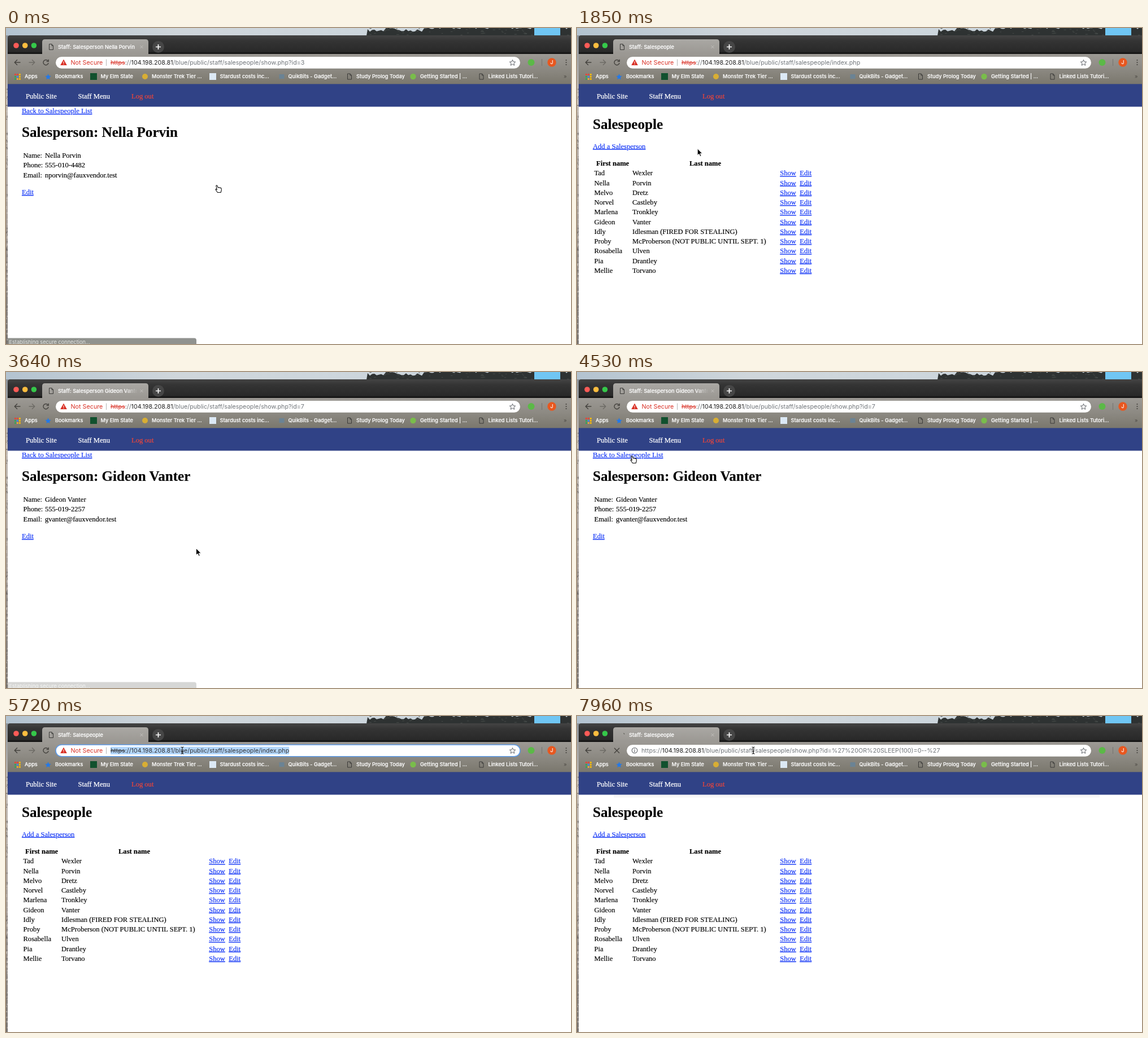
Animation of 1000x560 px, one loop 8 s. Source, as an HTML page:

```html
<!DOCTYPE html>
<html lang="en">
<head>
<meta charset="utf-8">
<title>Salespeople admin</title>
<style>
  html, body { margin: 0; width: 100%; height: 100%; overflow: hidden; background: #fff; }
  svg { display: block; width: 100vw; height: 100vh; }
  text { white-space: pre; }
  .ui { font: 500 9.2px Inter, Roboto, sans-serif; }
  .label { stroke: #fff; stroke-width: .2; }
  .url { font: 400 10.76px Inter, Roboto, sans-serif; }
  .page { font: 12.55px "Liberation Serif", "Times New Roman", serif; stroke: #000; stroke-width: .15; }
  .bold { font-weight: 700; }
  .h1 { font-size: 25.1px; font-weight: 700; }
  .link { fill: #0b2ff5; stroke: #0b2ff5; text-decoration: underline; }
  .nav { stroke: #fff; stroke-width: .25; }
  .logout { stroke: #fa4635; }
  .popup { filter: drop-shadow(0 3px 4px #0005); }
</style>
</head>
<body>
<svg viewBox="0 0 1000 560" preserveAspectRatio="none">
  <defs>
    <linearGradient id="sky"><stop stop-color="#b3c3d0"/><stop offset=".3" stop-color="#cfd6db"/><stop offset="1" stop-color="#c9d5de"/></linearGradient>
    <linearGradient id="shore" x2="0" y2="1"><stop stop-color="#8d949b"/><stop offset=".2" stop-color="#c3bcb5"/><stop offset=".6" stop-color="#a69d97"/><stop offset="1" stop-color="#77726e"/></linearGradient>
    <linearGradient id="strip" x2="0" y2="1"><stop stop-color="#444"/><stop offset=".3" stop-color="#343434"/><stop offset=".88" stop-color="#292929"/><stop offset=".95" stop-color="#151515"/></linearGradient>
    <linearGradient id="tab" x2="0" y2="1"><stop stop-color="#aaa8a4"/><stop offset="1" stop-color="#9a9792"/></linearGradient>
    <linearGradient id="bar" x2="0" y2="1"><stop stop-color="#9c9994"/><stop offset=".5" stop-color="#8c8982"/><stop offset="1" stop-color="#7a776d"/></linearGradient>
    <linearGradient id="fade" gradientUnits="userSpaceOnUse" x1="210" x2="233"><stop stop-color="#fff"/><stop offset="1" stop-color="#000"/></linearGradient>
    <mask id="titleFade" maskUnits="userSpaceOnUse" x="80" y="20" width="160" height="26"><rect x="80" y="20" width="160" height="26" fill="url(#fade)"/></mask>
  </defs>
  <g id="backdrop"></g>
  <g id="scene"></g>
</svg>
<script>
const LOOP = 8000;
const HOST = '104.198.208.81';
const DIR = '/blue/public/staff/salespeople/';
const LIST = DIR + 'index.php';
const QUERY = DIR + "show.php?id=' OR SLEEP(100)=0--'";
const CONNECTING = 'Establishing secure connection...';

const people = [
  ['Tad', 'Wexler'], ['Nella', 'Porvin'], ['Melvo', 'Dretz'], ['Norvel', 'Castleby'],
  ['Marlena', 'Tronkley'], ['Gideon', 'Vanter'], ['Idly', 'Idlesman (FIRED FOR STEALING)'],
  ['Proby', 'McProberson (NOT PUBLIC UNTIL SEPT. 1)'], ['Rosabella', 'Ulven'],
  ['Pia', 'Drantley'], ['Mellie', 'Torvano']
];
const nella = { name: 'Nella Porvin', phone: '555-010-4482', email: 'nporvin@fauxvendor.test', id: 3 };
const gideon = { name: 'Gideon Vanter', phone: '555-019-2257', email: 'gvanter@fauxvendor.test', id: 7 };

const text = (x, y, s, cls, fill = '#000', extra = '') =>
  `<text x="${x}" y="${y}" class="${cls}" fill="${fill}" ${extra}>${s}</text>`;
const rect = (x, y, w, h, fill, extra = '') =>
  `<rect x="${x}" y="${y}" width="${w}" height="${h}" fill="${fill}" ${extra}/>`;
const dot = (x, y, r, fill, extra = '') => `<circle cx="${x}" cy="${y}" r="${r}" fill="${fill}" ${extra}/>`;
const line = (d, stroke, width = 1.3, fill = 'none') =>
  `<path d="${d}" stroke="${stroke}" stroke-width="${width}" fill="${fill}" stroke-linejoin="round"/>`;
const at = (x, y, s) => `<g transform="translate(${x} ${y})">${s}</g>`;
const docIcon = (x, y) => at(x, y, line('M-3.5-5H1L3.5-2.3V5H-3.5zM1-5V-2H3.5', '#3b3a38', 1));
const STAR = 'M0-5.2 1.5-1.7 5.2-1.4 2.4 1 3.3 4.7 0 2.7-3.3 4.7-2.4 1-5.2-1.4-1.5-1.7z';

// Small repeatable generator for foliage and shore texture
let seed = 7;
const random = () => (seed = seed * 16807 % 2147483647) / 2147483647;

function drawBackdrop() {
  let s = rect(0, 0, 1000, 14, 'url(#sky)') + rect(0, 13, 4, 547, 'url(#shore)');
  let trees = 'M638 14';
  for (let x = 640; x <= 1000; x += 4) {
    const gap = x < 672 || (x > 690 && x < 738);
    trees += `L${x} ${(gap ? 2 : -3) + random() * 5}`;
  }
  s += `<path d="${trees}V14z" fill="#2e3232"/>`;
  for (let i = 0; i < 60; i++)
    s += rect(642 + random() * 356, random() * 12, 2 + random() * 3, 1, '#454a48');
  s += rect(935, 0, 46, 13, '#70c6f4');
  for (let i = 0; i < 120; i++)
    s += rect(random() * 2, 100 + random() * 460, 2, 1 + random() * 2, i % 2 ? '#66625f' : '#cdc5bd', 'opacity=".6"');

  s += `<path d="M3 46V17q0-4 4-4H1000V46z" fill="url(#strip)"/>`;
  ['#fc5b57', '#fdbd3f', '#35c84a'].forEach((c, i) => s += dot(18 + i * 15.7, 31, 4.8, c));
  s += '<path d="M64 47V25q0-5 5-5H247q5 0 5 5V47z" fill="url(#tab)"/>';
  s += line('M237.5 31l5 5m0-5l-5 5', '#c2c0bd', 1);
  s += dot(269.5, 33.5, 10.5, '#464646') + line('M269.5 29v9M265 33.5h9', '#fff', 1.7);
  s += rect(3, 46, 997, 54, 'url(#bar)');

  s += line('M25.5 61H15.5M20 56.2L15.2 61 20 65.8', '#45433f', 1.4);
  s += line('M40.5 61H50.5M46 56.2L50.8 61 46 65.8', '#6e6b66', 1.4);
  s += dot(929.5, 61, 6, '#5bb947') + line('M948.5 55V67', '#77746e', 1) + dot(966, 61, 7.7, '#e8571f');
  s += text(966, 64.2, 'J', 'ui', '#fff', 'text-anchor="middle"');
  for (const y of [57, 61, 65]) s += dot(991.5, y, 1.1, '#45433f');

  ['#ea4335', '#ea4335', '#fbbc05', '#34a853', '#4285f4', '#fbbc05', '#34a853', '#f4a83a', '#fbbc05'].forEach((c, i) =>
    s += rect(15 + i % 3 * 4, 81 + (i / 3 | 0) * 4, 2.8, 2.8, c));
  s += at(74.5, 86.5, `<path d="${STAR}" fill="#2379e8"/>`);
  s += rect(149, 80, 12, 12, '#11512e') + dot(246, 86, 5, '#d8ae34') + rect(360, 80, 12, 12, '#dce9f5');
  s += rect(483.5, 82, 9, 8, '#6b8394') + docIcon(608, 86) + dot(720.5, 86, 5.2, '#79bd4b') + docIcon(841.5, 86);
  [[33, 'Apps'], [87, 'Bookmarks'], [167.5, 'My Elm State'], [258, 'Monster Trek Tier ...'],
    [378.5, 'Stardust costs inc...'], [499.5, 'QuikBits - Gadget...'], [620, 'Study Prolog Today'],
    [733, 'Getting Started | ...'], [853.5, 'Linked Lists Tutori...']]
    .forEach(([x, name]) => s += text(x, 89.4, name, 'ui label', '#fff'));
  s += text(987, 89, '»', 'ui', '#55524c');

  s += rect(3, 99.3, 997, 40.4, '#304286') + rect(3, 139.7, 997, 421, '#fff');
  s += text(35, 125, 'Public Site', 'page nav', '#fff') + text(127.5, 125, 'Staff Menu', 'page nav', '#fff');
  return s + text(222, 125, 'Log out', 'page logout', '#fa4635');
}

function personPage(p) {
  let s = text(28, 151, 'Back to Salespeople List', 'page link');
  s += text(28, 193, 'Salesperson: ' + p.name, 'page h1');
  [['Name:', p.name], ['Phone:', p.phone], ['Email:', p.email]].forEach(([label, value], i) =>
    s += text(30.5, 230 + i * 17.25, label, 'page') + text(69, 230 + i * 17.25, value, 'page'));
  return s + text(28, 295, 'Edit', 'page link');
}

function listPage() {
  let s = text(28, 179, 'Salespeople', 'page h1') + text(28, 213.5, 'Add a Salesperson', 'page link');
  s += text(34, 244, 'First name', 'page bold') + text(199, 244, 'Last name', 'page bold');
  people.forEach(([first, last], i) => {
    const y = 261.3 + i * 17.25;
    s += text(30.5, y, first, 'page') + text(98, y, last, 'page');
    s += text(359.3, y, 'Show', 'page link') + text(394.3, y, 'Edit', 'page link');
  });
  return s;
}

// Last entry whose start time has passed
const current = (t, rows) => rows.filter(r => r[0] <= t).pop();

// [first step, last step, number of steps, target x, target y]
const moves = [
  [150, 1110, 7, 92, 155], [1410, 2300, 7, 410, 322], [2450, 2740, 3, 385, 350],
  [3490, 4530, 8, 100, 155], [4830, 5570, 6, 312, 61]
];

function cursorAt(t) {
  let x = 376, y = 285, shape = 'hand';
  for (const [from, to, steps, tx, ty] of moves) {
    if (t < from) break;
    const k = Math.min(steps, Math.floor((t - from) / (to - from) * (steps - 1) + 1.001));
    const p = k / steps, ease = p * p * (3 - 2 * p);
    x += (tx - x) * ease;
    y += (ty - y) * ease;
    shape = y < 72 ? 'beam' : k === steps ? 'hand' : 'arrow';
  }
  const shapes = {
    hand: line('M-4.2-5.5q1-1.6 2.1 0l1.3 3.4q1.3-1 2 .2q1.4-.8 2 .4q1.7-.5 1.9 1l.2 3.2-1.2 3.8h-5.6l-3.4-4.8q-.6-1.8 1-1.1l1.2 1z', '#111', 1.1, '#fff'),
    arrow: line('M-4-7v12l2.8-2.6 2 4.4 2-.9-2-4.2h3.8z', '#fff', 0.9, '#000'),
    beam: line('M-2.5-6q2.5 0 2.5 1.5q0-1.5 2.5-1.5M0-5V5M-2.5 6q2.5 0 2.5-1.5q0 1.5 2.5 1.5M-1.5 1.5h3', '#111', 1.1)
  };
  return at(x.toFixed(1), y.toFixed(1), shapes[shape]);
}

function statusBubble(t) {
  const back = 'https://' + HOST + LIST, show = 'https://' + HOST + DIR + 'show.php?id=7';
  const [, label, opacity] = current(t, [
    [0, CONNECTING, .55], [150, CONNECTING, .2], [300, '', 0],
    [1110, back, .4], [1260, back, .9], [1410, CONNECTING, .5], [1560, CONNECTING, .2], [1710, '', 0],
    [2450, show, .4], [2600, show, .8], [2740, show, 1], [3490, CONNECTING, .55], [3640, CONNECTING, .2], [3790, '', 0],
    [4680, back, .4], [4830, CONNECTING, .5], [4980, CONNECTING, .2], [5130, '', 0]
  ]);
  return `<g opacity="${opacity}"><path d="M3 560V549.5H333q4 0 4 4V560z" fill="#363a33"/>` +
    text(5.5, 560.3, label, 'ui', '#d0d2cc', 'style="font-weight:400"') + '</g>';
}

const address = (path, scheme, host, rest) =>
  `<tspan fill="${scheme}">https</tspan><tspan fill="${rest}">://</tspan><tspan fill="${host}">${HOST}</tspan><tspan fill="${rest}">${path}</tspan>`;
const struckAddress = (path, scheme, host, rest) =>
  address(path, scheme, host, rest).replace('<tspan', '<tspan text-decoration="line-through"');

function omnibox(t, path) {
  const selected = t >= 5720 && t < 6770;
  let s = rect(88, 51, 822, 20.8, '#fff', `rx="10.4" ${selected ? 'stroke="#5d9be8" stroke-width="1.6"' : ''}`);
  s += at(896.5, 61.5, line(STAR, '#5f6368', 1));
  if (t >= 7660) {
    s += dot(102, 61, 4.8, 'none', 'stroke="#5f6368" stroke-width="1.1"') + line('M102 60.3V64M102 58V59.2', '#5f6368', 1.2);
    return s + text(114, 65, address(DIR + 'show.php?id=%27%20OR%20SLEEP(100)=0--%27', '#70757a', '#222', '#70757a'), 'url');
  }
  s += '<path d="M102 55.5L107.8 66H96.2z" fill="#d93025"/>' + line('M102 59.2V62.6M102 63.6V64.8', '#fff', 1.1);
  s += text(114.5, 65, 'Not Secure', 'url', '#d93025') + line('M177.5 55.5V67', '#b5b5b5', 1);
  if (selected) s += rect(185, 54.5, selectionWidth, 13.5, '#b3d7fd');
  const colors = selected ? ['#333', '#333', '#333'] : ['#d93025', '#222', '#70757a'];
  return s + text(185, 65, struckAddress(path, ...colors), 'url');
}

function suggestions(t) {
  const globe = y => dot(102, y, 4.8, '#5f6368') + line(`M99 ${y - 2}l3 1 1 2-2 2M104 ${y - 3}l1 2`, '#fff', 1);
  let s = `<g class="popup">${rect(83, 47, 832, 85, '#fff', 'rx="4"')}</g>` + globe(61) + globe(89.3);
  s += dot(101, 116.7, 3.1, 'none', 'stroke="#5f6368" stroke-width="1.2"') + line('M103.3 119l3.2 3.2', '#5f6368', 1.3);
  s += text(123.5, 65, address(QUERY, '#70757a', '#222', '#70757a'), 'url');
  s += text(123.5, 93, 'https://' + HOST + DIR + 'show.php?id=%27 OR SLEEP(100)=0--%27', 'url bold', '#1a6be0');
  s += text(123.5, 121.3, `https://${HOST}${QUERY}<tspan fill="#5f6368"> - Quarble Search</tspan>`, 'url', '#222');
  if (t < 7210) s += rect(572, 54.5, 1, 13.5, '#222');
  return s;
}

function draw(t) {
  const within = (a, b) => t >= a && t < b;
  const person = t < 1410 ? nella : within(3190, 4830) ? gideon : null;
  const spinning = within(1260, 1410) || within(2740, 3190) || within(4680, 4830) || t >= 7660;
  const stopShown = spinning || within(3190, 3490);

  let s = person ? personPage(person) : listPage();
  if (spinning) {
    const angle = -100 - Math.floor((t - 3040) / 150) * 66;
    s += at(80, 33.5, `<g transform="rotate(${angle})">${line('M4 0A4 4 0 0 1 3.2 2.4', '#55534f', 1.2)}</g>`);
  } else {
    s += docIcon(80, 33.5);
  }
  s += text(92, 36.8, person ? 'Staff: Salesperson ' + person.name : 'Staff: Salespeople', 'ui label', '#fff',
    person === gideon ? 'mask="url(#titleFade)"' : '');
  s += stopShown
    ? line('M66 56.7l9 9m0-9l-9 9', '#45433f', 1.4)
    : line('M74.2 58.2A4.6 4.6 0 1 0 75.1 62M75.2 55.8V59.4H71.5', '#45433f', 1.4);
  s += omnibox(t, person ? DIR + 'show.php?id=' + person.id : LIST);
  if (within(6770, 7660)) s += suggestions(t);
  if (t >= 7660) s += rect(65, 139.7, 860, 5, '#000', 'opacity=".03"');
  return s + statusBubble(t) + cursorAt(t);
}

const scene = document.getElementById('scene');
document.getElementById('backdrop').innerHTML = drawBackdrop();
scene.innerHTML = text(185, 65, 'https://' + HOST + LIST, 'url');
const selectionWidth = scene.firstChild.getComputedTextLength();

let shown = '';
function tick() {
  const markup = draw(performance.now() % LOOP);
  if (markup !== shown) scene.innerHTML = shown = markup;
  requestAnimationFrame(tick);
}
tick();
</script>
</body>
</html>
```
